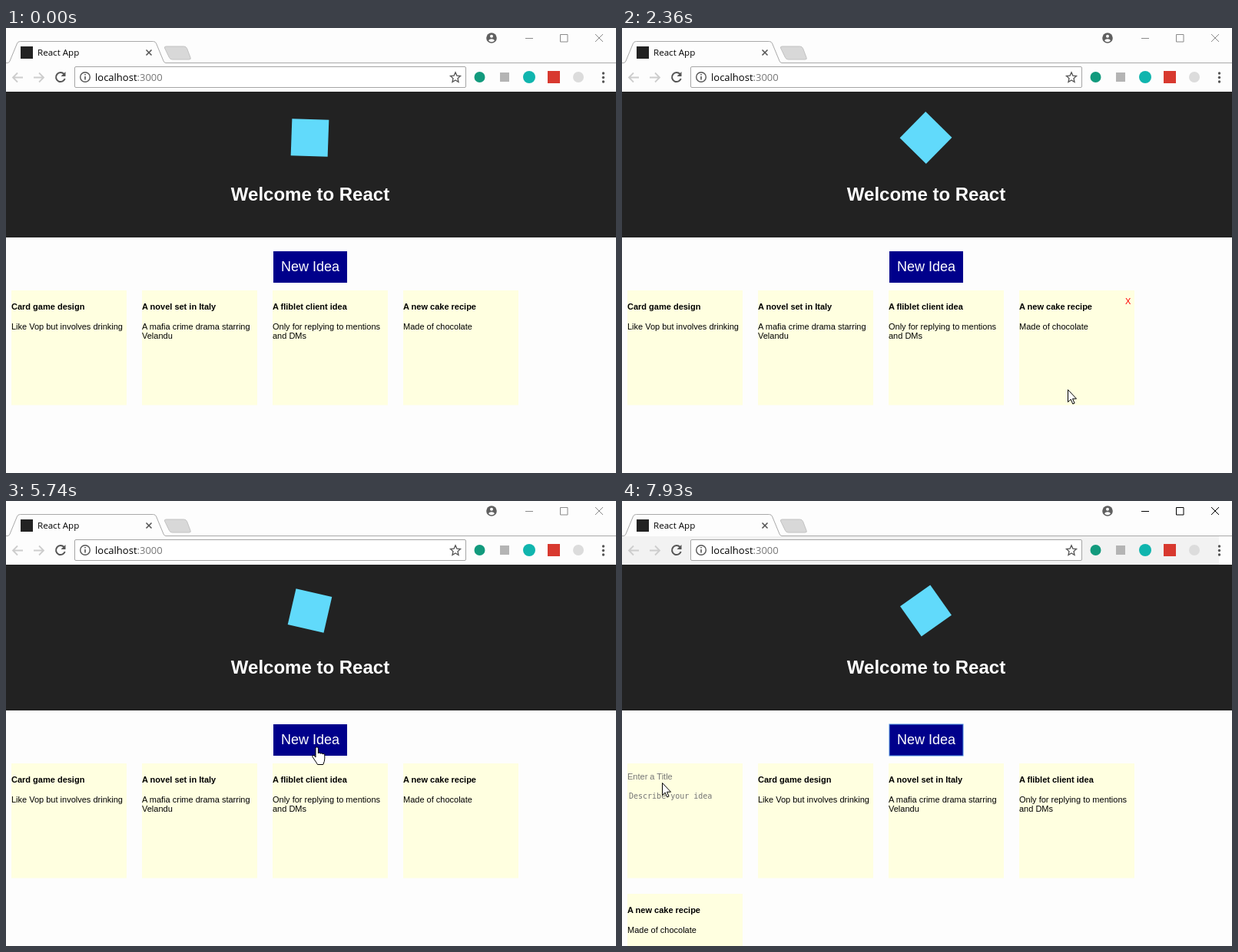
Write an HTML page that moves like this. It is 794 px wide and 580 px high and loops after 8000 ms.

```html
<!DOCTYPE html>
<html lang="en">
<head>
<meta charset="utf-8">
<title>Idea board</title>
<style>
html, body { margin: 0; width: 100%; height: 100%; overflow: hidden; background: #fdfdfd; }
svg { display: block; }
text { font-family: "Liberation Sans", Arial, sans-serif; font-size: 11px; white-space: pre; }
.ui { font-family: "Open Sans", "Noto Sans", sans-serif; }
.mono { font-family: "DejaVu Sans Mono", monospace; font-size: 10px; }
.hint { fill: #757575; }
.b { font-weight: bold; }
.line { fill: none; stroke: #555; }
</style>
</head>
<body>
<svg width="794" height="580" viewBox="0 0 794 580">
  <rect width="794" height="580" fill="#fdfdfd"/>

  <!-- window frame and tab strip -->
  <rect id="toolbar" y="46" width="777" height="37" fill="#f2f2f2"/>
  <path d="M206.500 26q-.5-2 2-2h23q3 0 4 2.500l4.500 12q1 2.500-1.500 2.500h-22q-3 0-4-2.500z" fill="#d8d8d8" stroke="#c2c2c2"/>
  <path d="M0 45.500h2q2 0 3-2.500l9.500-23q1-2.500 4-2.500h173q3 0 4 2.500l9.500 23q1 2.500 3 2.500h586" class="line" style="stroke:#a9a9a9"/>
  <rect x="19" y="24" width="16" height="16" fill="#222"/>
  <text class="ui" x="41" y="36" style="font-size:11.6px">React App</text>
  <path d="M182.500 28.500l7 7m0-7l-7 7" class="line" stroke-width="1.600"/>
  <circle cx="632" cy="13" r="6.800" fill="#5f5f5f"/>
  <circle cx="632" cy="10.800" r="2" fill="#fdfdfd"/>
  <path d="M628 16.300q1-2 4-2t4 2q-1.500 2-4 2t-4-2z" fill="#fdfdfd"/>
  <path id="buttons" d="M676 13.500h10M721.500 8.500h9.500v9.500h-9.500zM767 8l10 10m0-10l-10 10" fill="none"/>

  <!-- address row -->
  <path d="M22 64.500H9m6-6l-6 6 6 6M36 64.500h13m-6-6l6 6-6 6" class="line" style="stroke:#cdcdcd" stroke-width="1.800"/>
  <path d="M75.500 60a6 6 0 1 0 1.200 6" class="line" stroke-width="2"/>
  <path d="M77.500 57v6h-6z" fill="#555"/>
  <rect x="89.500" y="50.500" width="509" height="27" rx="1.500" fill="#fff" stroke="#a5a5a5"/>
  <circle cx="103" cy="64" r="6.300" class="line" stroke-width="1.400"/>
  <path d="M103 63v4.500m0-7.500v1.600" class="line" stroke-width="1.600"/>
  <text class="ui" x="116" y="69" style="font-size:13px">localhost<tspan fill="#777">:3000</tspan></text>
  <path d="M585 57.800l1.900 4.300 4.600.5-3.500 3.100 1 4.600-4-2.400-4 2.400 1-4.600-3.500-3.100 4.600-.5z" class="line" stroke-width="1.300"/>
  <circle cx="616.500" cy="64" r="7" fill="#129a7d"/>
  <rect x="643" y="58" width="12" height="12" fill="#b4b4b4"/>
  <circle cx="681" cy="64" r="8" fill="#10b5ae"/>
  <rect x="705" y="56" width="16" height="16" fill="#d8392f"/>
  <circle cx="745" cy="64" r="7" fill="#dcdcdc"/>
  <g fill="#555"><circle cx="777.500" cy="59" r="1.700"/><circle cx="777.500" cy="64.500" r="1.700"/><circle cx="777.500" cy="70" r="1.700"/></g>

  <!-- page -->
  <rect y="83" width="794" height="190" fill="#222"/>
  <rect id="mark" x="371.500" y="119" width="48" height="48" fill="#61dafb"/>
  <text class="b" x="396" y="225" text-anchor="middle" fill="#fff" style="font-size:24px">Welcome to React</text>
  <rect id="button" x="348" y="291" width="96" height="41" fill="#00008b"/>
  <text x="358" y="317" fill="#fff" style="font-size:18px">New Idea</text>
  <g id="before"></g>
  <g id="after"></g>
  <text id="remove" fill="#f00">X</text>

  <g fill="#fff" stroke="#000" stroke-linejoin="round">
    <path id="arrow" d="M.5.5v16l3.700-3.500 2.600 6 2.300-1-2.600-5.800h5z"/>
    <path id="hand" d="M-1 14V2.500a1.700 1.700 0 0 1 3.400 0V9a1.600 1.600 0 0 1 3 .3 1.600 1.600 0 0 1 2.800.6 1.500 1.500 0 0 1 2.600 1V16q0 3-2 7.500H1.500q-1-2-3.500-5.500L-5 13.500q-.7-2 1-2.200 1.400 0 3 2.700z"/>
  </g>
</svg>
<script>
const $ = id => document.getElementById(id);
const LOOP = 8000, CLICK = 5740;

const ideas = [
  ["Card game design", "Like Vop but involves drinking"],
  ["A novel set in Italy", "A mafia crime drama starring", "Velandu"],
  ["A fliblet client idea", "Only for replying to mentions", "and DMs"],
  ["A new cake recipe", "Made of chocolate"]
];

const place = i => [7 + i % 4 * 170, 342 + Math.floor(i / 4) * 170];

function card(i, content) {
  const [x, y] = place(i);
  return `<g transform="translate(${x} ${y})"><rect width="150" height="149.500" fill="#ffffe0"/>${content}</g>`;
}

const idea = ([title, ...lines]) => `<text class="b" y="25">${title}</text>` +
  lines.map((s, n) => `<text y="${51 + 12 * n}">${s}</text>`).join("");

const blank = '<text class="hint" y="21">Enter a Title</text>' +
  '<text class="hint mono" x="2" y="46">Describe your idea</text>';

$("before").innerHTML = ideas.map((d, i) => card(i, idea(d))).join("");
$("after").innerHTML = card(0, blank) + ideas.map((d, i) => card(i + 1, idea(d))).join("");

// pointer path: time, x, y
const path = [
  [130, 325, 1], [273, 543, 63], [700, 612, 330], [1130, 625, 450], [1900, 625, 450],
  [2210, 592, 466], [2360, 580, 471], [2620, 560, 455], [3320, 404, 320],
  [6100, 404, 320], [6590, 254, 349], [7100, 150, 374], [7660, 52, 367], [8000, 52, 367]
];

function pointer(t) {
  const n = path.findIndex(p => p[0] > t);
  const [a, b] = [path[n - 1], path[n]];
  const k = (t - a[0]) / (b[0] - a[0]);
  return [1, 2].map(j => Math.round(a[j] + (b[j] - a[j]) * k));
}

// the screen refreshes in bursts of eight even steps
const bursts = [[130, 1130], [1250, 2210], [2360, 3320], [3440, 4370], [4510, 5460], [5610, 6590], [6710, 7660], [7780, 8830]];

function refresh(t) {
  const burst = bursts.findLast(b => b[0] <= t);
  if (!burst) return 0;
  const step = (burst[1] - burst[0]) / 7;
  return burst[0] + Math.min(7, Math.floor((t - burst[0]) / step + 1e-6)) * step;
}

const show = (id, on) => $(id).style.display = on ? "" : "none";

function draw(t) {
  const added = t >= CLICK, visible = t >= 130;
  const [x, y] = visible ? pointer(t) : [-50, -50];
  const onButton = x >= 348 && x < 444 && y >= 291 && y < 332;
  const col = Math.floor((x - 7) / 170);
  const onCard = col >= 0 && col < 4 && x - place(col)[0] < 150 && y > 351 && y < 492;

  $("mark").setAttribute("transform", `rotate(${2 + t * 0.018} 395.500 143)`);
  show("before", !added);
  show("after", added);
  show("toolbar", added);
  $("buttons").setAttribute("stroke", added ? "#000" : "#8a8a8a");
  $("button").setAttribute("stroke", added ? "#4d8fe0" : "none");

  show("remove", onCard && !(added && col === 0));
  $("remove").setAttribute("x", 145 + col * 170);
  $("remove").setAttribute("y", 360);

  show("arrow", visible && !onButton);
  show("hand", visible && onButton);
  for (const id of ["arrow", "hand"]) $(id).setAttribute("transform", `translate(${x} ${y})`);
}

const start = performance.now();
function tick() {
  draw(refresh((performance.now() - start) % LOOP));
  requestAnimationFrame(tick);
}
tick();
</script>
</body>
</html>
```
